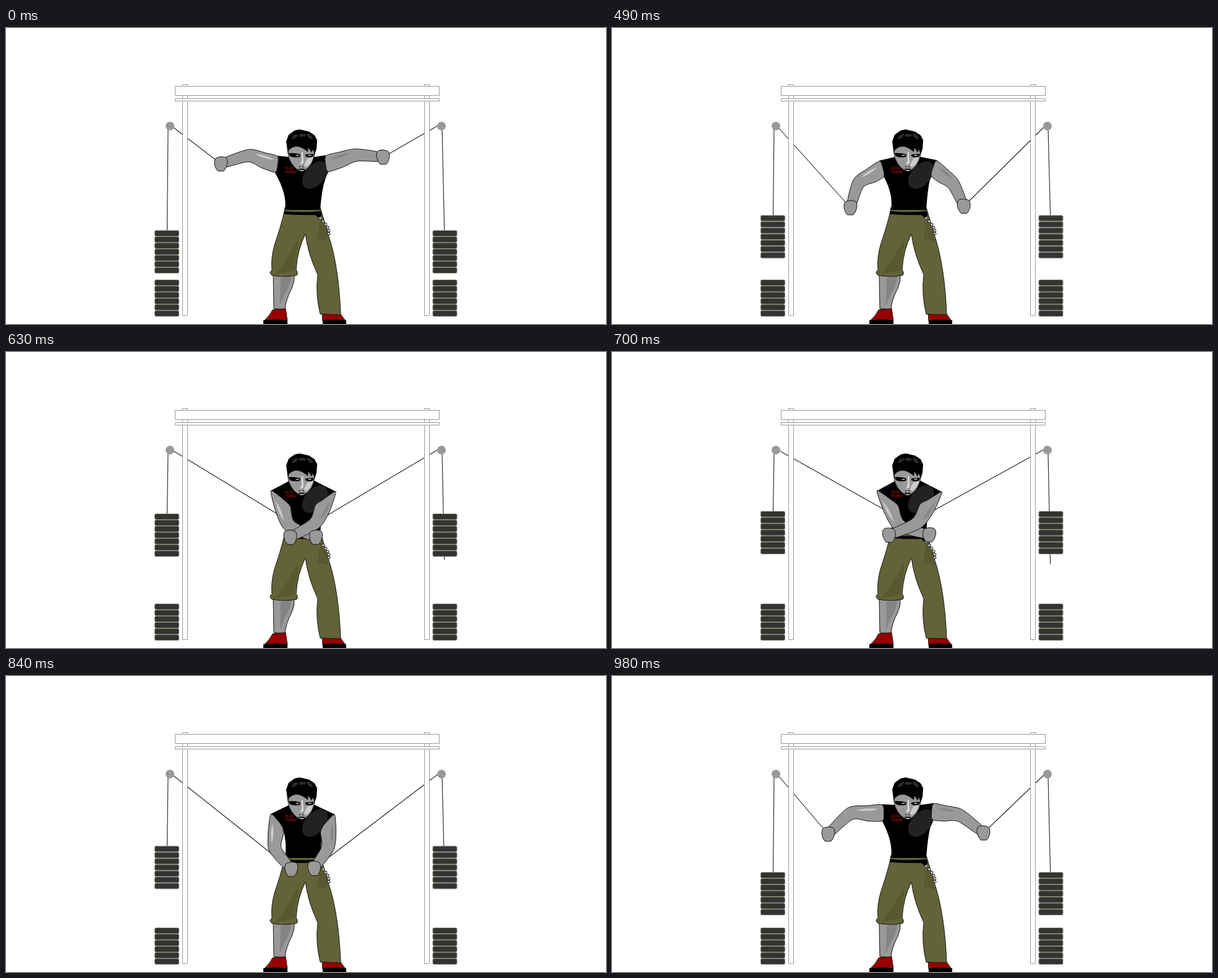
Recreate the animation shown at these times as an HTML page with a canvas. Size 970 px wide and 480 px high, loop 1.4 s.

```html
<!DOCTYPE html>
<html lang="en">
<head>
<meta charset="utf-8">
<title>Cable crossover</title>
<style>
html, body { margin: 0; width: 100%; height: 100%; overflow: hidden; background: #fff; }
canvas { display: block; }
</style>
</head>
<body>
<canvas id="stage" width="970" height="480"></canvas>
<script>
const ctx = document.getElementById('stage').getContext('2d');
const LOOP = 1400, STEP = 70, REST = 6;
const SKIN = '#999', OLIVE = '#626338', OLIVE_DARK = '#585930', SHADE = '#848484', INK = '#161616';

// Key poses: arms wide, lowering, at the sides, crossed.
// Each holds the shoulder, elbow and hand; the outline follows from these joints.
const left = {
  side: -1, shine: '#ccc', pulley: [265, 157],
  joints: [
    [437, 221, 391.5, 207, 347.5, 220.5],
    [437, 222, 384.5, 223.5, 349.5, 256.5],
    [435, 235, 412, 280.5, 421.5, 326.5],
    [439, 233, 459, 282, 501, 300.5]
  ]
};
const right = {
  side: 1, shine: SHADE, pulley: [704, 155],
  joints: [
    [519, 220, 567, 206, 609.5, 209.5],
    [519, 220, 563.5, 226.5, 600.5, 254.5],
    [522, 235, 541, 281, 537, 323.5],
    [522, 234, 498.5, 278.5, 459.5, 300.5]
  ]
};
const stackTop = [[328], [318], [289], [262]];

// Pose held in each step after the opening rest.
const beats = [1, 1.5, 2, 3, 3.15, 3, 2.5, 2, 1];

function poseAt(ms) {
  const n = Math.floor(ms / STEP) - REST;
  return n < 0 ? 0 : beats[Math.min(n, beats.length - 1)];
}

function mix(keys, pose) {
  const i = Math.min(Math.floor(pose), keys.length - 2);
  return keys[i].map((v, j) => v + (keys[i + 1][j] - v) * (pose - i));
}

const add = (p, v, k) => [p[0] + v[0] * k, p[1] + v[1] * k];
const lerp = (p, q, k) => [p[0] + (q[0] - p[0]) * k, p[1] + (q[1] - p[1]) * k];

function unit(x, y) {
  const d = Math.hypot(x, y);
  return [x / d, y / d];
}

// Joints of one arm, with the normals that point to its inner side.
function rig({ side, joints }, pose) {
  const j = mix(joints, pose);
  const shoulder = j.slice(0, 2), elbow = j.slice(2, 4), hand = j.slice(4);
  const normal = (p, q) => unit(side * (p[1] - q[1]), side * (q[0] - p[0]));
  const upper = normal(shoulder, elbow), fore = normal(elbow, hand);
  return {
    shoulder, elbow, hand, upper, fore,
    bend: unit(upper[0] + fore[0], upper[1] + fore[1]),
    cut: unit(upper[0], upper[1] + 1)
  };
}

function paint(path, fill, stroke, width = 1) {
  if (fill) { ctx.fillStyle = fill; ctx.fill(path); }
  if (stroke) { ctx.strokeStyle = stroke; ctx.lineWidth = width; ctx.stroke(path); }
}

const shape = (d, fill, stroke, width) => paint(new Path2D(d), fill, stroke, width);
const line = (p, q) => shape(`M${p}L${q}`, null, '#222', 1.1);

function oval(x, y, rx, ry, turn, fill, stroke) {
  const p = new Path2D();
  p.ellipse(x, y, rx, ry, turn, 0, Math.PI * 2);
  paint(p, fill, stroke);
}

function box(x, y, w, h, r = 0, fill = '#fff', stroke = '#999') {
  const p = new Path2D();
  p.roundRect(x, y, w, h, r);
  paint(p, fill, stroke);
}

// Closed smooth curve through points.
function blob(pts, fill, stroke) {
  const n = pts.length, at = i => pts[(i + n) % n], p = new Path2D();
  p.moveTo(...at(0));
  for (let i = 0; i < n; i++) {
    const [a, b, c, d] = [at(i - 1), at(i), at(i + 1), at(i + 2)];
    const out = add(b, [c[0] - a[0], c[1] - a[1]], 1 / 8);
    const back = add(c, [b[0] - d[0], b[1] - d[1]], 1 / 8);
    p.bezierCurveTo(...out, ...back, ...c);
  }
  paint(p, fill, stroke);
}

function plates(x, top, count) {
  for (let i = 0; i < count; i++) box(x + .5, top + i * 10 + .5, 39, 9, 2, '#333', '#7f7f6e');
}

function machine(pose, arms) {
  const top = mix(stackTop, pose)[0];
  const slack = Math.max(0, pose - 2) * 75;
  line(left.pulley, arms[0].hand);
  line(right.pulley, arms[1].hand);
  line([262, 162], [260.5, top]);
  line([705, 162], [708.7, top + slack]);
  for (const x of [265, 704]) oval(x, 159, 7, 7, 0, SKIN);
  for (const x of [285.5, 676.5]) box(x, 91.5, 8, 375);
  box(273.5, 94.5, 427, 15);
  box(273.5, 114.5, 427, 4);
  for (const x of [240, 689.5]) {
    plates(x, top, 7);
    plates(x, 408, 6);
  }
}

function legs() {
  shape('M432 400L433 455L451 457Q452 441 462 422Q467 411 466 400Z', SKIN, INK);
  shape('M444 405L461 402Q460 417 451 431L443 449Z', SHADE);
  shape('M417 475Q427 466 431 457L452 455L455 475Z', '#900', INK);
  shape('M511 463L541 464L549 475L512 476Z', '#900', INK);
  for (const [x, w] of [[416, 39], [512, 38]])
    shape(`M${x} 480V474Q${x + w / 2} 471 ${x + w} 474V480Z`, '#000');
  shape('M451 291L449 302Q443 326 434 352Q428 374 430 393Q424 396 430 401Q450 405 470 401' +
    'Q473 397 469 392Q471 360 484 334Q488 366 504 400Q500 432 508 464L541 465' +
    'Q538 385 521 335L508 291Z', OLIVE, INK);
  shape('M473 341Q458 369 436 399L465 394Q471 366 473 341Z', OLIVE_DARK);
  shape('M508 311Q505 328 504 342L522 346Q519 326 508 311Z', OLIVE_DARK);
}

function torso(arms) {
  const [l, r] = arms.map(a => ({ top: add(a.shoulder, a.cut, -14), pit: add(a.shoulder, a.cut, 14) }));
  shape(`M${l.top}L458 209H499L${r.top}L${r.pit}Q511 252 508 295H451Q455 270 ${l.pit}Z`, '#000');
  shape('M450 297Q479 300 509 297V303Q479 304 449 302Z', '#000');
  shape('M451 295.5Q479 298 508 295.5', null, OLIVE, 1.4);
  shape('M501 300H510V305H501ZM503 297H508V307H503Z', '#000');
  for (let u = 0; u <= 1; u += .2)
    oval(508 + 14 * Math.sin(1.7 * u), 308.5 + 25 * u, 2.2, 2.2, 0, '#ccc', INK);
  oval(499.5, 238.5, 26, 16, -.87, '#222');
  ctx.fillStyle = '#d81010';
  [['DUSK', 6, 229], ['TORV', 8, 236]].forEach(([word, size, y]) => {
    ctx.font = `italic ${size}px "Open Sans", sans-serif`;
    ctx.fillText(word, 451, y);
  });
}

function head() {
  shape('M456 190L457 210Q462 224 473 231H483Q497 222 499 203L498 188Z', SKIN, INK);
  shape('M487 212L497 208Q494 220 485 226L482 222Z', '#ccc');
  shape('M456 207L453 184L457 173L467 166L475 164.5L490 168L499 174L503 182L502 196L499 205' +
    'L496 197L494 202L489 194L488 201Q468 184 456 200Z', '#000');
  for (let i = 0; i < 3; i++) oval(467 + i * 12, 176 - i % 2 * 2, 6, 2.5, -.7 + i * .7, '#2b2b28');
  shape('M457 203Q466 202 476 205L475 209Q466 211 459 208Z', '#000');
  shape('M484 205L498 204L496 209Q489 211 484 208Z', '#000');
  for (const x of [471, 491]) oval(x, 206.5, 3, .8, 0, '#ddd');
  shape('M478 201H480L481 219L475 222L478 216Z', '#ddd');
  shape('M474 225H476M479 225H481M473 229H483', null, '#000', 1.6);
  shape('M475 231.5H481', null, '#ddd');
}

function arm({ shine }, a) {
  const bicep = lerp(a.shoulder, a.elbow, .45);
  const ribs = [[a.shoulder, a.cut, 13], [bicep, a.upper, 12.5], [a.elbow, a.bend, 10], [a.hand, a.fore, 6.5]];
  const outer = ribs.map(([p, n, w]) => add(p, n, -w));
  const inner = ribs.map(([p, n, w]) => add(p, n, w)).reverse();
  const cap = lerp(a.shoulder, a.elbow, -.05);
  blob([...outer, ...inner, cap], SKIN, INK);

  const along = (k, off) => add(lerp(a.shoulder, a.elbow, k), a.upper, -off);
  shape(`M${along(.1, 6)}Q${along(.5, 10)} ${along(.8, 6)}Q${along(.5, 2)} ${along(.1, 6)}Z`, shine);
}

function fist({ side }, a) {
  ctx.save();
  ctx.translate(...a.hand);
  ctx.scale(-side, 1);
  shape('M-10.5 -2Q-10 -10 -6 -10.5Q0 -13 7 -11Q11 -9 10.5 -1Q9 7 4.5 11.5H-5Q-10 6 -10.5 -2Z', SKIN, INK);
  ctx.restore();
}

function draw(now) {
  const pose = poseAt(now % LOOP), sides = [left, right];
  const arms = sides.map(s => rig(s, pose));
  ctx.fillStyle = '#fff';
  ctx.fillRect(0, 0, 970, 480);
  machine(pose, arms);
  legs();
  torso(arms);
  head();
  sides.forEach((s, i) => arm(s, arms[i]));
  sides.forEach((s, i) => fist(s, arms[i]));
  requestAnimationFrame(draw);
}

draw(0);
</script>
</body>
</html>
```
